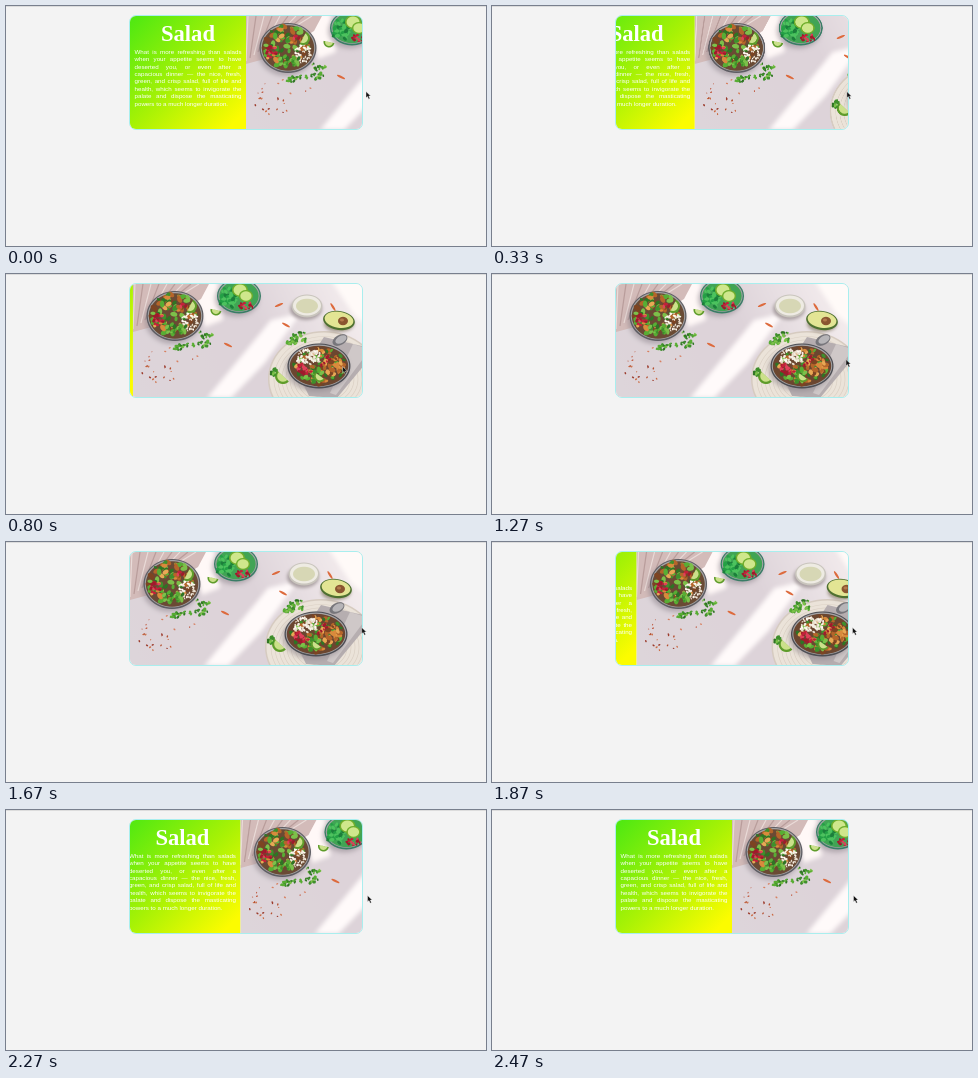
These frames come from a looping animation (480x240 px, 2540 ms). An HTML page with a canvas:

```html
<!DOCTYPE html>
<html lang="en">
<head>
<meta charset="utf-8">
<title>Salad card</title>
<style>
  html, body { margin: 0; width: 100%; height: 100%; overflow: hidden; background: #f3f3f3; }
  #stage { position: relative; width: 480px; height: 240px; overflow: hidden; box-sizing: border-box; border-top: 1px solid #dcdcdc; }
  #card { position: absolute; left: 123px; top: 8px; width: 232px; height: 113px; border: 1px solid #a9eeee; border-radius: 7px; overflow: hidden; }
  #strip { position: absolute; left: 0; top: 0; display: flex; }
  #panel { flex: none; width: 116px; height: 113px; color: #fff; background: linear-gradient(135deg, #4ce812, #a8f205 50%, #fcfc00 92%); }
  h1 { margin: 0; padding-top: 4px; text-align: center; font: bold 22.6px/28px "Liberation Serif", "Times New Roman", serif; }
  p { margin: 0 4.5px; text-align: justify; font: 6.2px/7.36px "Liberation Sans", Arial, sans-serif; }
  canvas { flex: none; width: 233px; height: 114px; }
  #cursor { position: absolute; left: 0; top: -1px; }
</style>
</head>
<body>
<div id="stage">
  <div id="card">
    <div id="strip">
      <div id="panel">
        <h1>Salad</h1>
        <p>What is more refreshing than salads when your appetite seems to have deserted you, or even after a capacious dinner — the nice, fresh, green, and crisp salad, full of life and health, which seems to invigorate the palate and dispose the masticating powers to a much longer duration.</p>
      </div>
      <canvas width="466" height="228"></canvas>
    </div>
  </div>
  <svg id="cursor" width="8" height="10"><path d="M.5 .5V6.8L2 5.5 3.2 8.2 4.4 7.6 3.3 5.1H5.2Z" fill="#111" stroke="#fff" stroke-width=".4"/></svg>
</div>
<script>
const ctx = document.querySelector('canvas').getContext('2d');
const strip = document.getElementById('strip');
const cursor = document.getElementById('cursor');

let seed = 7;
const random = () => (seed = seed * 16807 % 2147483647) / 2147483647;
const pick = list => list[Math.floor(random() * list.length)];

function oval(x, y, rx, ry, color, turn = 0) {
  ctx.fillStyle = color;
  ctx.beginPath();
  ctx.ellipse(x, y, rx, ry, turn, 0, 7);
  ctx.fill();
}

function poly(color, ...points) {
  ctx.fillStyle = color;
  ctx.beginPath();
  for (let i = 0; i < points.length; i += 2) ctx.lineTo(points[i], points[i + 1]);
  ctx.fill();
}

// Scatters small morsels over an oval area.
function bits(x, y, rx, ry, count, size, colors) {
  for (let i = 0; i < count; i++) {
    const angle = random() * 6.28, r = Math.sqrt(random()), s = size * (.6 + random() * .7);
    oval(x + rx * r * Math.cos(angle), y + ry * r * Math.sin(angle), s, s * .65, pick(colors), random() * 3);
  }
}

function blurred(radius, draw) {
  ctx.filter = `blur(${radius}px)`;
  draw();
  ctx.filter = 'none';
}

function bowl(x, y, rx, ry, rim, inside) {
  blurred(5, () => oval(x - 2, y + 3, rx, ry, '#8d848c88'));
  oval(x, y, rx, ry, rim);
  oval(x, y - .3, rx - 1.3, ry - 1.3, '#a5a4a6');
  oval(x, y, rx - 2.3, ry - 2.3, inside);
}

function limeSlice(x, y, r) {
  oval(x, y, r, r * .85, '#6fae2c');
  oval(x, y, r * .8, r * .68, '#cfe78c');
}

function wedge(x, y, r, turn) {
  ctx.save();
  ctx.translate(x, y);
  ctx.rotate(turn);
  for (const [size, color] of [[r, '#5f9c2a'], [r * .72, '#cbe08a']]) {
    ctx.fillStyle = color;
    ctx.beginPath();
    ctx.arc(0, 0, size, 0, Math.PI);
    ctx.fill();
  }
  ctx.restore();
}

const greens = ['#3f8f2c', '#58ad34', '#7cc04a', '#2f7424'];
const oranges = ['#d98a3c', '#b5652a', '#e8a855', '#7d4422'];
const reds = ['#c4203a', '#e0405a', '#a01a2c'];
const rice = ['#f6efe4', '#e8dccb', '#fffaf2'];
const parsley = (x, y, rx = 5, ry = 4) => bits(x, y, rx, ry, 16, 1.8, greens);
const chilli = (x, y, turn) => oval(x, y, 4.5, 1.1, '#dd6a3c', turn);

function drawPhoto() {
  ctx.scale(2, 2);
  ctx.translate(-124, -9);
  const table = ctx.createLinearGradient(130, 110, 350, 10);
  table.addColorStop(0, '#ddd5da');
  table.addColorStop(.55, '#ddd3d9');
  table.addColorStop(1, '#f6eff0');
  ctx.fillStyle = table;
  ctx.fillRect(124, 9, 233, 114);

  blurred(5, () => {
    poly('#fffafa', 262, 45, 292, 38, 256, 88, 222, 123, 198, 123);
    poly('#fff8f7', 178, 5, 208, 5, 214, 45, 196, 52);
    poly('#fffaf8', 322, 5, 360, 5, 360, 52, 345, 40);
  });

  // Pink cloth
  poly('#d3bbb9', 124, 9, 200, 9, 192, 24, 150, 50, 124, 57);
  ctx.lineWidth = 1.2;
  for (let i = 0; i < 9; i++) {
    ctx.strokeStyle = i % 2 ? '#b99d9b' : '#eadbd8';
    ctx.beginPath();
    ctx.moveTo(126 + i * 8, 9);
    ctx.lineTo(124 + i * 4, 54 - i * 3);
    ctx.stroke();
  }

  // Left bowl
  bowl(166, 41, 28.5, 25, '#5e5d63', '#6a4a34');
  bits(164, 39, 23, 20, 95, 3, [...oranges, ...greens]);
  bits(181, 47, 9, 9, 45, 1.4, rice);
  bits(149, 45, 6, 6, 14, 2, reds);
  bits(168, 54, 12, 6, 22, 2.2, greens);
  bits(174, 32, 3, 5, 5, 1.8, reds);
  wedge(181, 31, 7, -1.1);

  // Top bowl
  bowl(230, 21, 22, 17.5, '#397d66', '#41a455');
  bits(220, 23, 9, 11, 45, 2.4, ['#23a045', '#4cc25e', '#1c7f3b']);
  limeSlice(231, 15, 8);
  limeSlice(237, 21, 7);
  bits(238, 31, 8, 3.5, 30, 1.4, reds);

  wedge(207, 35, 5.5, .2);
  parsley(196, 60, 7, 5);
  parsley(195, 69, 7, 3);
  parsley(169, 72, 6, 3);
  bits(181, 70, 8, 1.5, 10, 1.2, greens);
  chilli(219, 70, .45);
  chilli(277, 50, .5);
  chilli(270, 30, -.4);
  chilli(324, 32, 1);
  bits(150, 98, 21, 10, 17, 1, ['#b5502f', '#cc6b42', '#9c3b2c']);
  bits(163, 84, 28, 12, 9, .9, ['#c05a40', '#d88060']);

  // Dip cup
  blurred(3, () => oval(297, 34, 16, 11, '#aaa0a2'));
  oval(298, 31, 15.5, 11.5, '#c9c5bd');
  oval(298, 30.5, 14, 10, '#eeebe3');
  oval(298, 31, 11, 7.3, '#d7d7b5');

  // Placemat and napkin
  oval(315, 104, 56, 48, '#d6cbc0');
  oval(315, 104, 54.5, 46.5, '#ebe3d9');
  ctx.strokeStyle = '#d9cec2';
  ctx.lineWidth = .6;
  for (let r = 6; r < 54; r += 4) {
    ctx.beginPath();
    ctx.ellipse(315, 104, r, r * .85, 0, 0, 7);
    ctx.stroke();
  }
  poly('#b6aeb0', 315, 62, 357, 72, 357, 88, 328, 123, 300, 121, 290, 100);
  poly('#cfc8c8', 344, 69, 357, 73, 357, 80, 327, 120, 321, 118);
  oval(331, 65, 8, 5, '#77767b', -.5);
  oval(332, 64.5, 6, 3.5, '#b7b5b8', -.5);

  // Avocado
  blurred(3, () => oval(330, 49, 15, 8, '#a49a8c'));
  oval(330, 45.5, 16, 9.5, '#4e7030', .15);
  oval(330, 44.8, 14.5, 8, '#e3e594', .15);
  oval(334, 46, 5, 4.3, '#8a5530');
  oval(333, 45, 2, 1.5, '#b37a4c');

  parsley(291, 62, 9, 5);
  parsley(283, 68, 5, 3);

  // Right bowl
  bowl(310, 91, 31.5, 22.5, '#4d4e54', '#6b4630');
  bits(311, 91, 26, 18, 80, 2.8, [...oranges, ...greens]);
  bits(299, 82, 13, 8, 60, 1.5, rice);
  bits(296, 94, 8, 6, 18, 2, reds);
  bits(324, 91, 10, 10, 30, 2.8, oranges);
  bits(306, 101, 11, 5, 20, 2.4, greens);
  bits(315, 86, 6, 5, 8, 1.8, reds);
  wedge(311, 101, 6, .6);

  wedge(274, 101, 8, .75);
  parsley(265, 97, 3, 4);
}

// CSS "ease" curve, solved by bisection.
function ease(x) {
  if (x <= 0) return 0;
  if (x >= 1) return 1;
  const bezier = (u, a, b) => 3 * u * (1 - u) ** 2 * a + 3 * u * u * (1 - u) * b + u ** 3;
  let low = 0, high = 1;
  for (let i = 0; i < 24; i++) {
    const mid = (low + high) / 2;
    if (bezier(mid, .25, .25) < x) low = mid; else high = mid;
  }
  return bezier(low, .1, 1);
}

// Pointer path: time, x, y
const path = [
  [0, 359.5, 85], [200, 356, 85], [330, 354.5, 85], [800, 336, 92],
  [1270, 353.5, 85], [1600, 353.5, 85], [1870, 360, 85], [2070, 361, 85], [2540, 361, 85]
];

function pointerAt(t) {
  const i = path.findIndex(point => point[0] > t);
  const [t0, x0, y0] = path[i - 1], [t1, x1, y1] = path[i];
  const k = (t - t0) / (t1 - t0);
  return [x0 + (x1 - x0) * k, y0 + (y1 - y0) * k];
}

const LOOP = 2540, STEP = LOOP / 38;

function render(now) {
  // The motion advances in even steps, about 15 per second.
  const t = Math.floor((now % LOOP + 5) / STEP) % 38 * STEP;
  const hidden = ease((t - 165) / 800) - ease((t - 1771) / 690);
  strip.style.transform = `translateX(${-116 * hidden}px)`;
  const [x, y] = pointerAt(t);
  cursor.style.transform = `translate(${x}px, ${y}px)`;
  requestAnimationFrame(render);
}

drawPhoto();
const start = performance.now();
requestAnimationFrame(() => render(0));
render = (draw => () => draw(performance.now() - start))(render);
</script>
</body>
</html>
```
